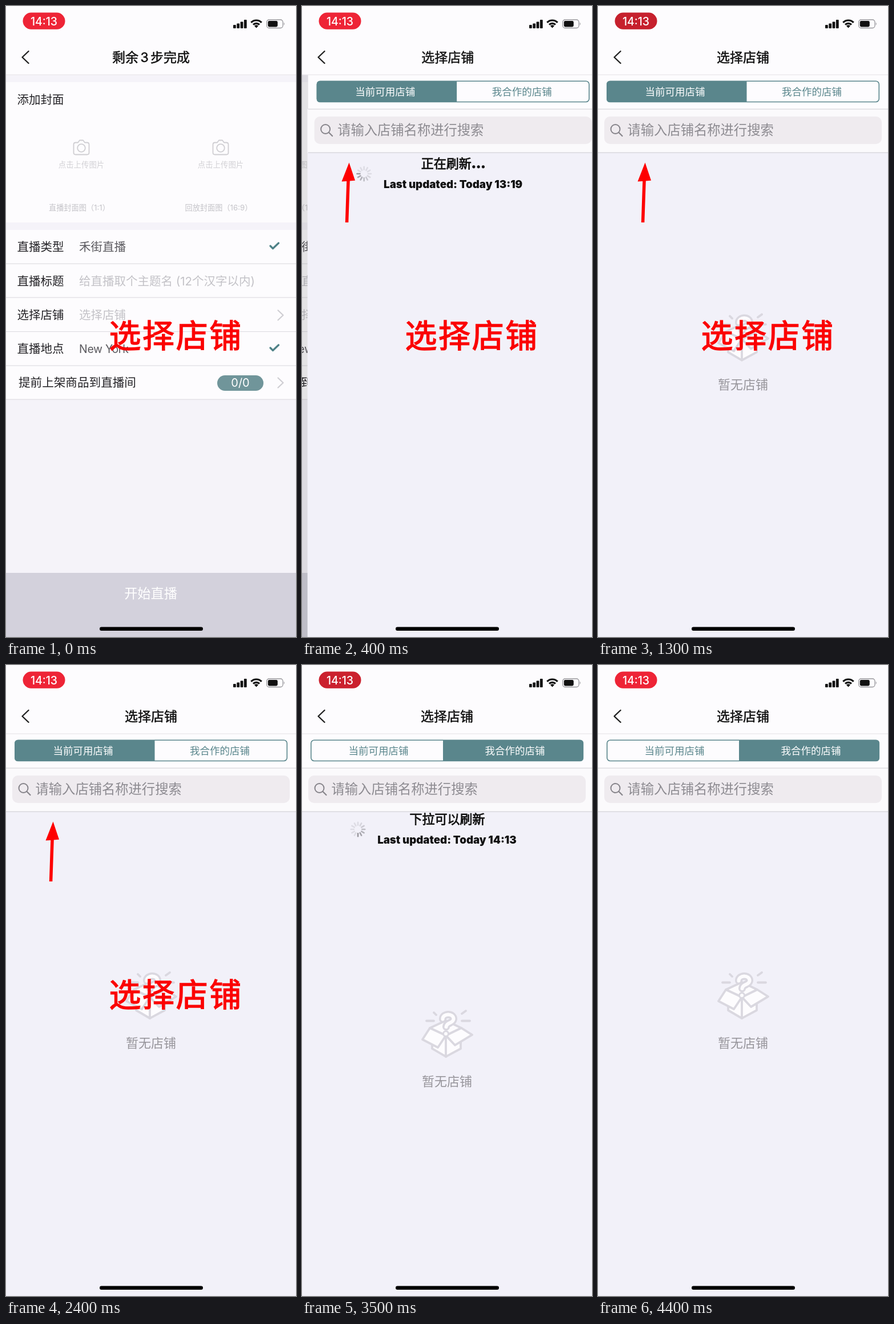
Recreate the animation shown at these times as an HTML page. Size 508 by 1102 pixels, loop 4.5 s.

```html
<!DOCTYPE html>
<html lang="zh-CN">
<head>
<meta charset="utf-8">
<title>选择店铺</title>
<style>
  html, body { margin: 0; width: 100%; height: 100%; overflow: hidden; background: #fdfcfe; }
  svg { display: block; width: 100vw; height: 100vh; }
  text { font-family: Inter, "Noto Sans CJK SC", "Noto Sans CJK", sans-serif; white-space: pre; }
</style>
</head>
<body>
<svg id="stage" viewBox="0 0 508 1102" preserveAspectRatio="none"></svg>
<script>
const LOOP = 4500, STEP = 100, W = 508, PULL = 73;
const TEAL = '#5a868c', PAPER = '#fdfcfe';

// ---- drawing helpers ----
const rect = (x, y, w, h, fill, r = 0, more = '') =>
  `<rect x="${x}" y="${y}" width="${w}" height="${h}" rx="${r}" fill="${fill}" ${more}/>`;
const path = (d, stroke, width, fill = 'none') =>
  `<path d="${d}" stroke="${stroke}" stroke-width="${width}" fill="${fill}" stroke-linecap="round" stroke-linejoin="round"/>`;
const hline = (y, color) => rect(0, y - 0.5, W, 1.2, color);
// y is the middle of the line of text
const text = (s, x, y, size, fill, more = '') =>
  `<text x="${x}" y="${(y + size * 0.35).toFixed(2)}" font-size="${size}" fill="${fill}" ${more}>${s}</text>`;
const mid = (s, x, y, size, fill, more = '') =>
  text(s, x, y, size, fill, 'text-anchor="middle" ' + more);
// a thin outline gives the weights between regular and bold
const heavy = (color, width) => `stroke="${color}" stroke-width="${width}"`;
const group = (id, body) => `<g id="${id}">${body}</g>`;

// ---- form page ----
function camera(cx) {
  const c = '#cfced2';
  return path(`M${cx - 10} 238.5h4l3-4h6l3 4h4q3.5 0 3.5 3.5v14q0 3.5-3.5 3.5h-20q-3.5 0-3.5-3.5v-14q0-3.5 3.5-3.5z`, c, 1.8) +
    `<circle cx="${cx}" cy="248" r="6.8" fill="none" stroke="${c}" stroke-width="1.8"/>` +
    mid('点击上传图片', cx, 277, 13.4, '#d2d1d5');
}
const check = y => path(`M463 ${y}l4.5 4.5l10-9.5`, '#4e8187', 3.2);
const arrowRight = y => path(`M476.5 ${y - 8.5}l9 8.5l-9 8.5`, '#cfced3', 2.2);
const label = (s, y) => text(s, 19.5, y, 20.5, '#232226');
const value = (s, y, color) => text(s, 128, y, 20.5, color);

function form() {
  const pale = '#c3c2c7', dark = '#5b5a5f';
  return rect(0, 120, W, 982, '#f5f3f9') +
    rect(0, 133, W, 245, PAPER) + rect(0, 391, W, 296, PAPER) +
    label('添加封面', 164) + camera(132) + camera(376) +
    text('直播封面图（1:1）', 75, 352, 13.2, '#c4c3c8') +
    text('回放封面图（16:9）', 313.5, 352, 13.2, '#c4c3c8') +
    [450, 509, 568.5, 628, 687].map(y => hline(y, '#dfdde3')).join('') +
    label('直播类型', 421) + value('禾街直播', 421, dark) + check(419) +
    label('直播标题', 480.5) + value('给直播取个主题名 (12个汉字以内)', 480.5, pale) +
    label('选择店铺', 540) + value('选择店铺', 540, pale) + arrowRight(540) +
    label('直播地点', 599) + text('New York', 128, 599.5, 19.5, dark, 'letter-spacing="-.3"') + check(597) +
    text('提前上架商品到直播间', 22, 658, 20.6, '#232226') +
    rect(370, 645, 81, 27, '#70959a', 13.5) + mid('0/0', 410.5, 658.3, 20, '#fff') + arrowRight(658) +
    rect(0, 990, W, 112, '#d3d1dc') + mid('开始直播', 253.5, 1026, 23.2, '#fff');
}

// ---- shop list pages ----
function emptyBox() {
  const c = '#dad8e0', w = 3.8, hook = 'M246.5 551.5C246 541 266 540.5 265.5 551.5C265 559 253 557 252.5 565';
  return path('M218 554.5h13M231 540l4 4M280 542l7-5M280 554.5h14', c, w) +
    path('M224 567L252 554L279 567L252 580z', c, w, PAPER) +
    path('M228 590V603L252 617L278 603V588L252 580z', c, w, PAPER) +
    path('M252 580V617', c, w) +
    path('M224 567L211 587L238 601L252 580z', c, w, PAPER) +
    path('M279 567L298 579L268 597L252 580z', c, w, PAPER) +
    path(hook, c, 13) + path(hook, PAPER, 6) +
    `<circle cx="252" cy="577" r="4.5" fill="${PAPER}" stroke="${c}" stroke-width="3"/>` +
    mid('暂无店铺', 254, 660, 22, '#97959b');
}

function spinner() {
  let s = '';
  for (let i = 0; i < 12; i++)
    s += `<path d="M0-7.2V-12.2" transform="rotate(${-30 * i})" stroke="#77767c" stroke-opacity="${Math.max(0.17, 0.72 - i * 0.1).toFixed(2)}" stroke-width="2.6" stroke-linecap="round"/>`;
  return s;
}

function shopList(id, updated) {
  return rect(-1, 180, W + 2, 922, '#f2f1f9') +
    group(id + 'Empty', emptyBox()) +
    group(id + 'Head',
      group(id + 'Spin', spinner()) +
      mid('', 254.5, 275.5, 22, '#111', `id="${id}Hint" ` + heavy('#111', 0.8)) +
      mid('Last updated: Today ' + updated, 254, 311.5, 18.7, '#111', 'font-weight="900"')) +
    rect(-1, 180, W + 2, 76, '#fbfafc') + hline(256, '#d2d1d8') +
    rect(11, 193, 486, 48, '#efebef', 10) +
    '<circle cx="30.5" cy="215" r="8" fill="none" stroke="#86848a" stroke-width="2"/>' +
    path('M36.5 221L42.5 227', '#86848a', 2.2) +
    text('请输入店铺名称进行搜索', 51.5, 217, 23.3, '#8d8b91');
}

function tabs() {
  return rect(0, 120, W, 60, PAPER) + hline(180, '#d8d7dc') +
    `<path id="tabFill" fill="${TEAL}"/>` +
    rect(15.8, 131.3, 476.5, 36.2, 'none', 5.5, heavy(TEAL, 1.6)) +
    mid('当前可用店铺', 135, 150, 17.5, '', 'id="tabA"') +
    mid('我合作的店铺', 374.5, 150, 17.5, '', 'id="tabB"');
}

// ---- fixed parts ----
function statusBar() {
  const bars = [6, 8.5, 11.5, 15].map((h, i) => rect(398 + i * 6.3, 39 - h, 4.8, h, '#111', 1)).join('');
  const arc = r => {
    const k = r * 0.7071;
    return `<path d="M${438.5 - k} ${38 - k}A${r} ${r} 0 0 1 ${438.5 + k} ${38 - k}" fill="none" stroke="#111" stroke-width="3.2"/>`;
  };
  return '<rect id="pill" x="29.5" y="11.6" width="74" height="29.2" rx="14.6"/>' +
    mid('14:13', 66.5, 26.8, 19.5, '#fff', 'font-weight="500"') +
    bars + arc(13) + arc(7.7) + '<path d="M438.5 38.5l-3.5-3.8q3.5-2.8 7 0z" fill="#111"/>' +
    rect(456.7, 24, 28.3, 14.5, 'none', 4.2, heavy('#98979c', 1.3)) +
    rect(458.8, 26, 17, 10.5, '#111', 2.4) +
    '<path d="M486.7 28.5q2.3 2.7 0 5.5z" fill="#98979c"/>';
}

function nav() {
  return rect(0, 0, W, 120, PAPER) + hline(120, '#e9e7ec') + statusBar() +
    path('M39.5 79L28.5 89.5L39.5 100', '#222', 2.4) +
    mid('剩余 3 步完成', 254, 90, 23, '#111', 'id="titleA" word-spacing="-3" ' + heavy('#111', 0.5)) +
    mid('选择店铺', 254, 90, 23, '#111', 'id="titleB" ' + heavy('#111', 0.5));
}

const stage = document.getElementById('stage');
stage.innerHTML =
  group('form', form()) +
  rect(0, 120, W, 982, '#000', 0, 'id="dim"') +
  group('shop',
    group('pageA', shopList('a', '13:19')) +
    group('pageB', shopList('b', '14:13')) + tabs()) +
  nav() + rect(164, 1084.5, 181, 6.5, '#000', 3.2) +
  group('arrow', '<path d="M82.5 273.5L93 304.800L83.800 305.5L81.300 378H75.800L78.200 306L69.5 306.5z" fill="#fe0000"/>') +
  text('选择店铺', 180.5, 576, 56, '#fb0303', 'id="caption" letter-spacing="2.6" ' + heavy('#fb0303', 1.4));

// ---- motion ----
const el = id => document.getElementById(id);
const move = (id, x, y = 0) => el(id).setAttribute('transform', `translate(${x.toFixed(2)} ${y.toFixed(2)})`);
const show = (id, on) => { el(id).style.display = on ? '' : 'none'; };
const fade = (id, o) => { el(id).style.opacity = o; };
const ease = (t, start, dur) => {
  const p = Math.min(1, Math.max(0, (t - start) / dur));
  return p * p * (3 - 2 * p);
};

// share of the page push still to go, a critically damped spring
function pushLeft(t) {
  if (t < 100) return 1;
  const k = (t - 60) * 0.017;
  return t >= 700 ? 0 : (1 + k) * Math.exp(-k);
}

function refresh(id, t, end, phase) {
  const drop = PULL * (1 - ease(t, end, 340));
  show(id + 'Empty', t >= end);
  move(id + 'Empty', 0, drop);
  move(id + 'Head', 0, drop - PULL);
  el(id + 'Hint').innerHTML = t >= end ? '下拉可以刷新' : '正在刷新<tspan font-weight="900">...</tspan>';
  const turn = Math.round((phase + t * 0.36) / 30) * 30 % 360;
  el(id + 'Spin').setAttribute('transform', `translate(98 293) rotate(${turn})`);
}

function drawTabs(second) {
  el('tabFill').setAttribute('d', second
    ? 'M247 131H487q6 0 6 6V162q0 6-6 6H247z'
    : 'M260.5 131H21q-6 0-6 6V162q0 6 6 6H260.5z');
  el('tabA').setAttribute('fill', second ? TEAL : '#fff');
  el('tabB').setAttribute('fill', second ? '#fff' : TEAL);
  move('tabA', second ? -1 : 0);
  move('tabB', second ? -1.5 : 0);
}

function draw(t) {
  const q = pushLeft(t), slide = ease(t, 2630, 320);
  move('form', -0.3 * W * (1 - q));
  fade('dim', 0.1 * (1 - q));
  show('shop', q < 1);
  move('shop', W * q);
  move('titleA', -120 * (1 - q));
  fade('titleA', Math.max(0, q * 1.1 - 0.1));
  move('titleB', 60 * q);
  fade('titleB', 1 - q);

  refresh('a', t, 990, 126);
  refresh('b', t, 3440, 6);
  move('pageA', -W * slide);
  move('pageB', W * (1 - slide));
  show('pageB', slide > 0);
  drawTabs(t >= 2600);

  show('arrow', t >= 300 && t < 2600);
  show('caption', t < 3200);

  // the clock badge breathes every two seconds
  const d = Math.min(1, Math.max(0, 0.5 + 0.62 * Math.cos((t - 1200) * Math.PI / 1000)));
  el('pill').setAttribute('fill', `rgb(${238 - 40 * d},${36 - 4 * d},${54 - 9 * d})`);
}

function tick() {
  draw(Math.floor(performance.now() % LOOP / STEP) * STEP);
  requestAnimationFrame(tick);
}
tick();
</script>
</body>
</html>
```
